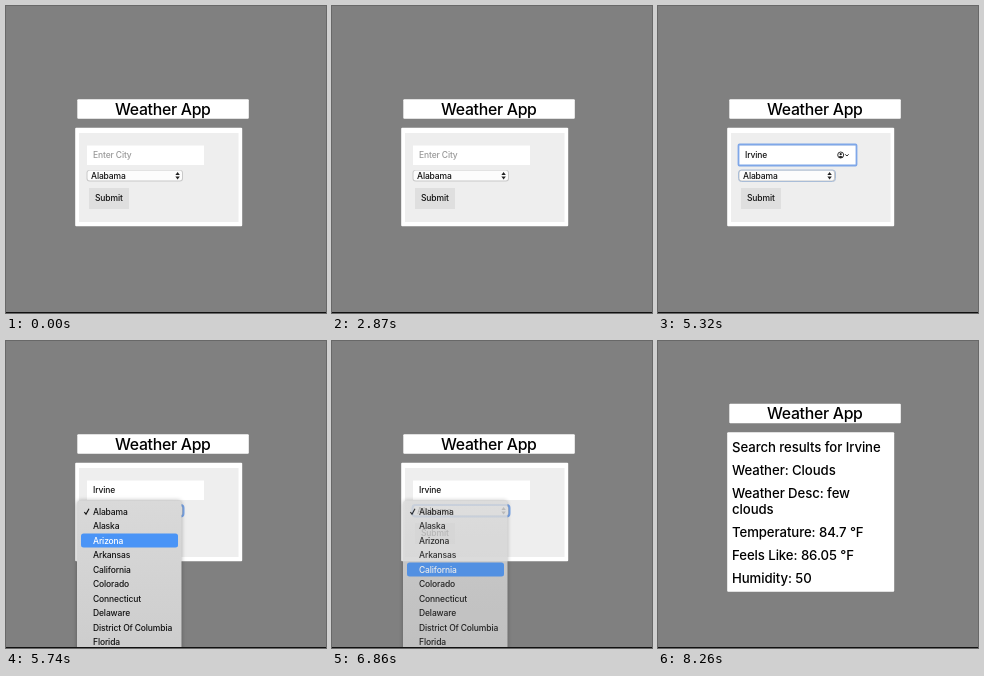
Write an HTML page with a canvas that moves like this. It is 320 by 307 pixels and loops after 9170 ms.

```html
<!DOCTYPE html>
<html lang="en">
<head>
<meta charset="utf-8">
<title>Weather App</title>
<style>
  html, body { margin: 0; width: 100%; height: 100%; overflow: hidden; background: #808080; }
  canvas { position: absolute; left: 0; top: 0; width: 320px; height: 307px; }
</style>
</head>
<body>
<canvas id="page" width="320" height="307"></canvas>
<canvas id="menu" width="320" height="307"></canvas>
<script>
const page = document.getElementById('page').getContext('2d');
const overlay = document.getElementById('menu').getContext('2d');
let ctx = page;

const LOOP = 9170, STEP = 70;
const BLUE = '#4a94f6';
const STATES = ['Alabama', 'Alaska', 'Arizona', 'Arkansas', 'California', 'Colorado',
  'Connecticut', 'Delaware', 'District Of Columbia', 'Florida'];
const RESULTS = [['Search results for Irvine', 111], ['Weather: Clouds', 134],
  ['Weather Desc: few', 157], ['clouds', 173], ['Temperature: 84.7 °F', 196],
  ['Feels Like: 86.05 °F', 219], ['Humidity: 50', 242]];
const KEY_TIMES = [3640, 4130, 4480, 4550, 4620, 4690];
const HOVER_TIMES = [5390, 5600, 5740, 6090, 6230];
const FOCUS = 2940, SELECT_FOCUS = 5320, MENU_OPEN = 5390, PICK = 6720,
  FADE = 6790, CHOSEN = 6930, MENU_GONE = 7210, BLUR = 7490, RESULT = 8260;

const countPassed = (times, t) => times.filter(time => t >= time).length;

function box(x, y, w, h, fill, radius = 0) {
  ctx.fillStyle = fill;
  ctx.beginPath();
  ctx.roundRect(x, y, w, h, radius);
  ctx.fill();
}

function ring(x, y, w, h, color, width, radius) {
  ctx.strokeStyle = color;
  ctx.lineWidth = width;
  ctx.beginPath();
  ctx.roundRect(x, y, w, h, radius);
  ctx.stroke();
}

function line(points, color, width) {
  ctx.strokeStyle = color;
  ctx.lineWidth = width;
  ctx.beginPath();
  points.forEach(([x, y]) => ctx.lineTo(x, y));
  ctx.stroke();
}

function text(string, x, y, size, color, weight, spacing) {
  ctx.font = `${weight} ${size}px Inter, sans-serif`;
  ctx.letterSpacing = spacing + 'px';
  ctx.fillStyle = color;
  ctx.fillText(string, x, y);
}

const label = (string, x, y, color = '#111') => text(string, x, y, 8.5, color, 500, -0.13);

function title(y) {
  box(71.3, y, 171.5, 19.5, '#fff', 1);
  text('Weather App', 109, y + 15.7, 15.8, '#000', 500, -0.28);
}

function autofillIcon() {
  ctx.strokeStyle = ctx.fillStyle = '#222';
  ctx.lineWidth = 0.9;
  ctx.beginPath();
  ctx.arc(182.7, 149, 3, 0, 7);
  ctx.stroke();
  ctx.beginPath();
  ctx.arc(182.7, 148.2, 1.1, 0, 7);
  ctx.ellipse(182.7, 151, 2, 1.1, 0, 0, 7);
  ctx.fill();
  line([[187.2, 148.3], [188.9, 150], [190.6, 148.3]], '#222', 1);
}

function cityInput(t) {
  box(81, 139.5, 117, 19.5, '#fff');
  const typed = 'Irvine'.slice(0, countPassed(KEY_TIMES, t));
  label(typed || 'Enter City', 87, 152, typed ? '#111' : '#999');
  if (t >= FOCUS && t < MENU_OPEN) {
    ring(80.5, 138.5, 118, 21, '#7fa7e8', 1.8, 1);
    autofillIcon();
  }
}

function stateSelect(t) {
  box(80.5, 164, 96.5, 11.5, '#c9c9c9', 3);
  box(81.5, 164.5, 94.5, 10, '#fcfcfc', 2.5);
  if (t >= SELECT_FOCUS && t < BLUR) {
    const faint = t < MENU_OPEN;
    ring(80.5, 164, 97, 11.5, faint ? '#a9bdd8' : '#79a4e6', faint ? 1 : 2, 3);
  }
  label(t < CHOSEN ? 'Alabama' : 'California', 85, 172.8);
  for (const [base, tip] of [[169, 166], [170.5, 173.5]]) {
    ctx.fillStyle = '#222';
    ctx.beginPath();
    ctx.moveTo(169.4, base);
    ctx.lineTo(173.8, base);
    ctx.lineTo(171.6, tip);
    ctx.fill();
  }
}

function form(t) {
  title(93.2);
  box(69.2, 121.7, 167, 98.6, '#fff', 1);
  box(73, 127, 159.5, 89, '#eee');
  cityInput(t);
  stateSelect(t);
  box(83, 182, 40, 21, t < FADE ? '#dfdfdf' : '#d6d6d6');
  label('Submit', 89, 195.2);
}

function results() {
  title(62.7);
  box(69.2, 91.3, 167, 159.4, '#fff', 1);
  RESULTS.forEach(([string, y]) => text(string, 74, y, 13.2, '#000', 500, -0.08));
}

// The menu has its own layer so that it fades as a whole.
function menu(t) {
  ctx.clearRect(0, 0, 320, 307);
  if (t < MENU_OPEN || t >= MENU_GONE) return;
  const faded = Math.max(0, Math.floor((t - FADE) / STEP) * STEP);
  ctx.canvas.style.opacity = 1 - faded / (MENU_GONE - FADE);

  const panel = ctx.createLinearGradient(0, 160, 0, 306);
  panel.addColorStop(0, '#d9d9d9');
  panel.addColorStop(1, '#cdcdcd');
  ctx.save();
  ctx.shadowColor = 'rgba(0,0,0,.3)';
  ctx.shadowBlur = 4;
  box(71, 159.5, 104.5, 160, panel, 4);
  ctx.restore();

  const blink = t >= PICK && t < FADE;
  const active = blink ? -1 : countPassed(HOVER_TIMES, t) - 1;
  STATES.forEach((name, i) => {
    const y = 170.5 + i * 14.5;
    const color = i === active ? '#fff' : '#111';
    if (i === active) box(75, y - 7, 97, 14, BLUE, 2.5);
    label(name, 87, y + 3, color);
    if (i === 0) line([[78.3, y + 0.5], [80, y + 2.7], [83, y - 2.7]], color, 1.2);
  });
  ctx.clearRect(0, 306, 320, 1);
}

function draw(t) {
  ctx = page;
  box(0, 0, 320, 307, '#808080');
  box(0, 306, 320, 1, '#111');
  t < RESULT ? form(t) : results();
  ctx = overlay;
  menu(t);
}

const start = performance.now();
function tick(now) {
  draw(Math.max(0, now - start) % LOOP);
  requestAnimationFrame(tick);
}
requestAnimationFrame(tick);
</script>
</body>
</html>
```
